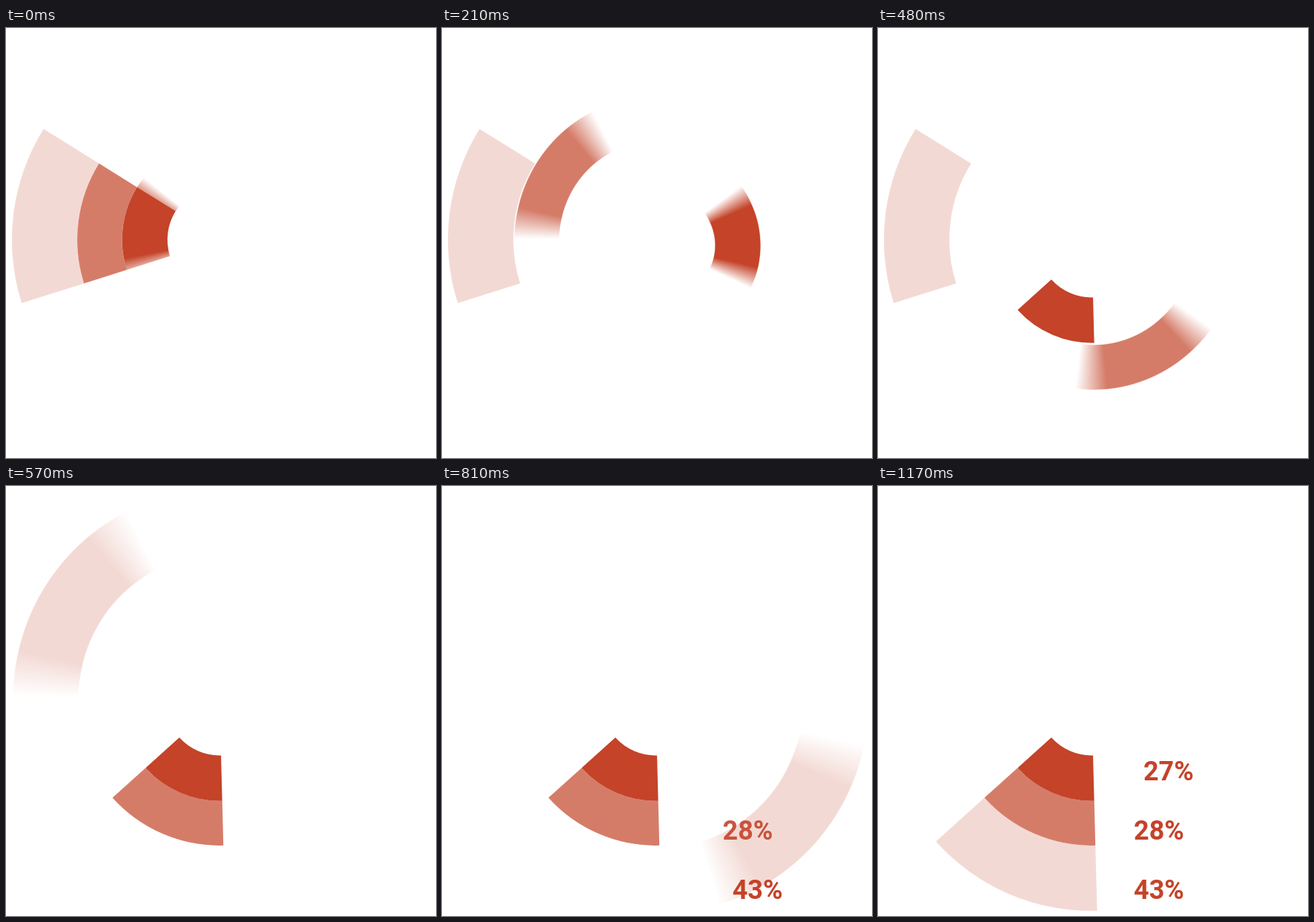
Animation of 580 by 580 pixels, one loop 1.2 s. Source, as an HTML page with a canvas:

```html
<!DOCTYPE html>
<html lang="en">
<head>
<meta charset="utf-8">
<title>Fan chart</title>
<style>
  html, body { margin: 0; width: 100%; height: 100%; overflow: hidden; background: #fff; }
  canvas, svg { position: absolute; left: 0; top: 0; width: 580px; height: 580px; }
  text { font: 700 36px Roboto, sans-serif; fill: #c44329; }
</style>
</head>
<body>
<canvas id="fan" width="580" height="580"></canvas>
<svg viewBox="0 0 580 580">
  <text x="345" y="557" opacity="0">43%</text>
  <text x="345" y="477" opacity="0">28%</text>
  <text x="345" y="397" opacity="0">27%</text>
</svg>
<script>
const SIZE = 580, LOOP = 1200, STEP = 30;
const SHUTTER = 15, SAMPLES = 16;
const SPIN = 360, TURN = 286.1;
const PIVOT = [292.6, 289.7], OFFSET = [-2, -4.1];
const FROM = 162.4, TO = 211.9;

const wedges = [
  { inner: 194.4, outer: 282.6, start: 547, color: '#f3d9d4' },
  { inner: 134.2, outer: 194.4, start: 187, color: '#d57c69' },
  { inner: 73, outer: 134.2, start: 7, color: '#c44329' }
];
const labelStarts = [588, 709, 873];
const SLIDE = 177, REACH = 55, FADE = 107;

const ctx = document.getElementById('fan').getContext('2d');
const layer = document.createElement('canvas');
layer.width = layer.height = SIZE;
const ink = layer.getContext('2d');
const labels = document.querySelectorAll('text');

const clamp = v => Math.min(1, Math.max(0, v));
const rad = deg => deg * Math.PI / 180;

function addWedge(w, angle) {
  ink.save();
  ink.translate(...PIVOT);
  ink.rotate(rad(angle));
  ink.translate(...OFFSET);
  ink.beginPath();
  ink.arc(0, 0, w.outer, rad(FROM), rad(TO));
  ink.arc(0, 0, w.inner, rad(TO), rad(FROM), true);
  ink.closePath();
  ink.fill();
  ink.restore();
}

// Averages the wedge over the open shutter, then tints the result.
function drawWedge(w, t) {
  ink.globalCompositeOperation = 'lighter';
  ink.globalAlpha = 1 / SAMPLES;
  ink.fillStyle = '#000';
  ink.clearRect(0, 0, SIZE, SIZE);
  for (let i = 0; i < SAMPLES; i++) {
    const time = t + SHUTTER * i / (SAMPLES - 1);
    addWedge(w, TURN * clamp((time - w.start) / SPIN));
  }
  ink.globalCompositeOperation = 'source-in';
  ink.globalAlpha = 1;
  ink.fillStyle = w.color;
  ink.fillRect(0, 0, SIZE, SIZE);
  ctx.drawImage(layer, 0, 0);
}

// Slides right and back while fading in.
function placeLabel(label, age) {
  const phase = 2 * clamp(age / (2 * SLIDE));
  const x = REACH * (1 - Math.cos(Math.PI * phase)) / 2;
  label.setAttribute('transform', `translate(${x.toFixed(2)} 0)`);
  label.setAttribute('opacity', clamp(age / FADE) ** 2);
}

function render(t) {
  ctx.clearRect(0, 0, SIZE, SIZE);
  wedges.forEach(w => drawWedge(w, t));
  labels.forEach((label, i) => placeLabel(label, t - labelStarts[i]));
}

let shown = -1;
function tick() {
  const t = Math.floor(performance.now() % LOOP / STEP) * STEP;
  if (t !== shown) render(shown = t);
  requestAnimationFrame(tick);
}
tick();
</script>
</body>
</html>
```
